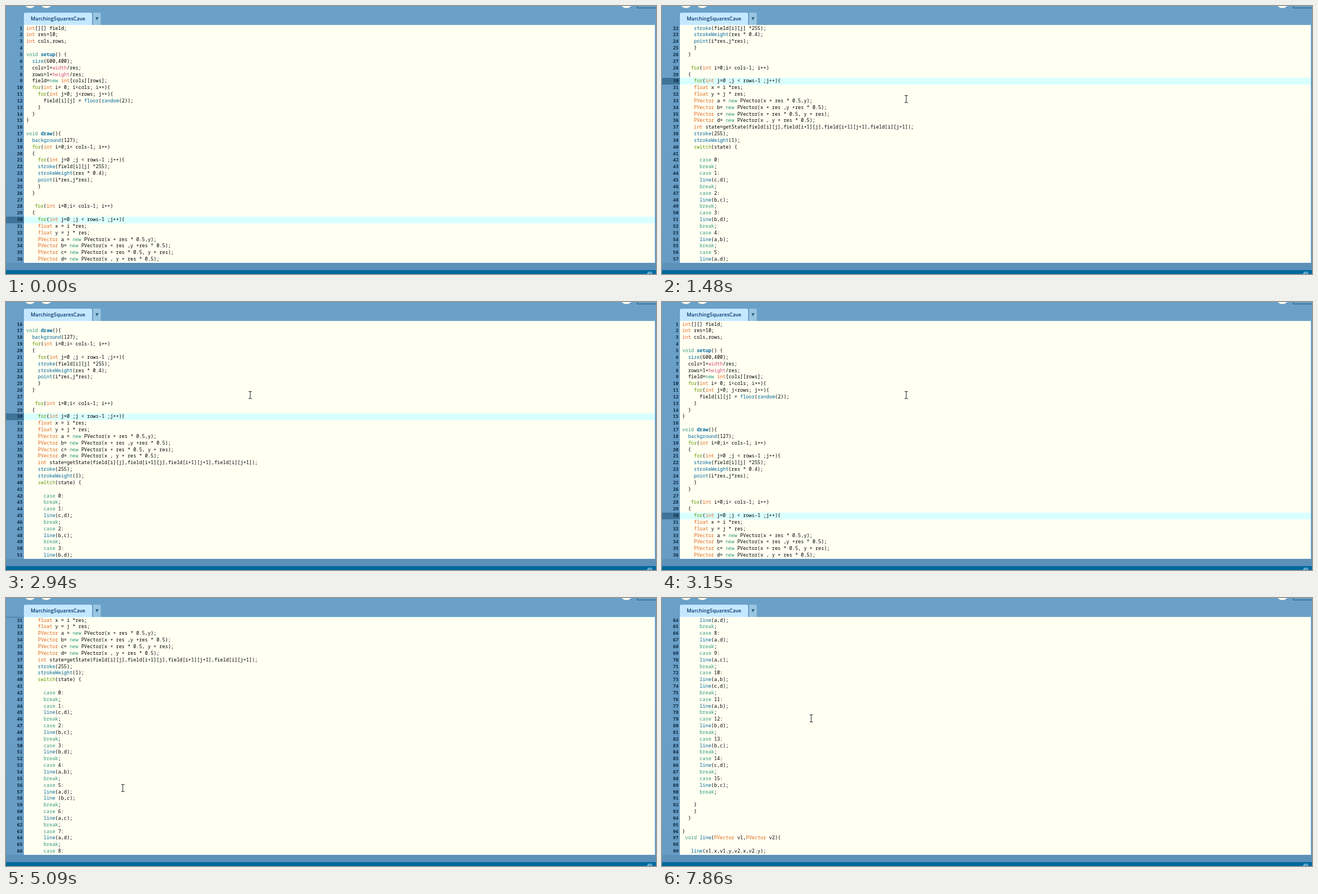
An HTML page that plays this animation: 1163 px wide and 481 px high, repeating every 8 s.

```html
<!DOCTYPE html>
<html lang="en">
<head>
<meta charset="utf-8">
<title>Code editor</title>
<style>
html, body { margin: 0; width: 100%; height: 100%; overflow: hidden; }
body {
  position: relative;
  background: linear-gradient(#6ba0c8, #679cc4 461px, #5c91b9 461px);
}
body > *, .row > *, #mark { position: absolute; }
svg { left: 0; top: 0; }
.tab {
  left: 32px; top: 12px; width: 122px; height: 22px; border-radius: 3px 3px 0 0;
  background: #c4e8ff; color: #07376b; text-align: center;
  font: 600 9.15px/21px "Open Sans", "Noto Sans", sans-serif;
}
.paper { left: 32px; top: 34px; width: 1129px; height: 427px; background: #fffff2; }
#view { left: 0; top: 34px; width: 1161px; height: 427px; overflow: hidden; }
#code { position: absolute; left: 0; top: 0; width: 100%; }
/* 11.84375px is a whole number of layout units, so rows do not drift */
.row {
  position: relative; height: 11.84375px; white-space: pre; color: #000;
  font: 8.64px/11.84375px "Noto Sans Mono", "DejaVu Sans Mono", monospace;
  font-variant-ligatures: none;
}
.row b { left: 0; width: 29.8px; text-align: right; color: #12304a; font-weight: 600; }
.row span { left: 36.3px; }
.row i { font-style: normal; }
.row.on { background: linear-gradient(90deg, #3f7398 32px, #d9ffff 32px); }
.type { color: #e2661a; }
.word { color: #33997e; }
.flow { color: #669900; }
.func, .main { color: #006699; }
.main { font-weight: bold; }
.var { color: #d94a7a; }
#mark {
  left: 57px; width: 5px; height: 11.84375px; box-sizing: border-box;
  border: 1px solid #3a7795; background: #d9f3f8;
}
#mouse { fill: none; stroke: #333; stroke-width: 1.1; }
</style>
</head>
<body>
<svg width="1163" height="481">
  <g fill="#fffff2">
    <circle cx="43" cy="-8" r="11.500"/>
    <circle cx="72" cy="-8" r="11.500"/>
    <circle cx="1110" cy="-8" r="11.500"/>
  </g>
  <path d="M1129.500 0V3.500H1163" fill="none" stroke="#1f4f78"/>
  <path d="M156 34V12H166.500Q169.500 12 169.500 15V34Z" fill="#9ac5e0"/>
  <path d="M160 20H165.500L162.750 26Z" fill="#2f6794"/>
  <rect y="474" width="1163" height="7" fill="#00699e"/>
  <path d="M1149.500 481V477.500H1155.500V481M1147.500 481V479.500H1153.500V481" fill="none" stroke="#a9d3ea"/>
</svg>
<div class="tab">MarchingSquaresCave</div>
<div class="paper"></div>
<div id="view"><div id="code"></div></div>
<svg width="1163" height="481">
  <path id="mouse" d="M-3 -6.500H-1L0 -5.500L1 -6.500H3M0 -5.500V5.500M-3 6.500H-1L0 5.500L1 6.500H3"/>
</svg>
<script>
const LOOP = 8000, STEP = 69, PITCH = 11.84375, INSET = 0.6;

const head = `int[][] field;
int res=10;
int cols,rows;

void setup() {
  size(600,400);
  cols=1+width/res;
  rows=1+height/res;
  field=new int[cols][rows];
  for(int i= 0; i<cols; i++){
    for(int j=0; j<rows; j++){
      field[i][j] = floor(random(2));
    }
  }
}

void draw(){
  background(127);
  for(int i=0;i< cols-1; i++)
  {
    for(int j=0 ;j < rows-1 ;j++){
    stroke(field[i][j] *255);
    strokeWeight(res * 0.4);
    point(i*res,j*res);
    }
  }

   for(int i=0;i< cols-1; i++)
  {
    for(int j=0 ;j < rows-1 ;j++){
    float x = i *res;
    float y = j * res;
    PVector a = new PVector(x + res * 0.5,y);
    PVector b= new PVector(x + res ,y +res * 0.5);
    PVector c= new PVector(x + res * 0.5, y + res);
    PVector d= new PVector(x , y + res * 0.5);
    int state=getState(field[i][j],field[i+1][j],field[i+1][j+1],field[i][j+1]);
    stroke(255);
    strokeWeight(1);
    switch(state) {
`;
const tail = `
    }
    }
  }

}
 void line(PVector v1,PVector v2){

   line(v1.x,v1.y,v2.x,v2.y);
 }
 int getState(int a,int b,int c,int d){

    return  a * 8 + b * 4 + c* 2 + d* 1;
  }
`;
// Line arguments of each switch case
const cases = "|cd|bc|bd|ab|ad bc|ac|ad|ad|ac|ab cd|ab|bd|bc|cd|bc".split("|").flatMap((pairs, n) => [
  `case ${n}:`,
  ...pairs.split(" ").filter(Boolean).map((p, k) => `line${n === 5 && k ? " " : ""}(${p[0]},${p[1]});`),
  "break;"
]).map(s => "      " + s);

const kinds = {};
const addKind = (kind, words) => words.split(" ").forEach(w => kinds[w] = kind);
addKind("type", "int float PVector");
addKind("word", "void new case break return");
addKind("flow", "for switch");
addKind("func", "size floor random background stroke strokeWeight point line");
addKind("main", "setup draw");
addKind("var", "width height");

const paint = line => line.replace(/</g, "&lt;").replace(/\b[A-Za-z]\w*\b(?!(?<=PVector)\()/g,
  w => kinds[w] ? `<i class="${kinds[w]}">${w}</i>` : w);

const lines = [...head.split("\n"), ...cases, ...tail.split("\n")];
const code = document.getElementById("code");
code.innerHTML = lines.map((line, n) =>
  `<div class="row"><b>${n + 1}</b><span>${paint(line)}</span></div>`).join("");
const rows = code.querySelectorAll(".row");
const mark = document.createElement("div");
mark.id = "mark";
rows[92].prepend(mark);
const mouse = document.getElementById("mouse");

// Each burst: start time, then one value per step
const scrolls = [
  [0, 1], [1270, 4, 10, 16, 22], [1940, 28, 34], [2470, 28, 22], [2940, 16, 10, 4, 1],
  [4620, 10, 19], [5090, 31, 43, 52], [5560, 61, 70], [7790, 67, 64]
];
const moves = [
  [0, null],
  [260, [1014, 445], [780, 325], [610, 245], [523, 209]],
  [670, [437, 167]],
  [3830, [350, 212], [255, 265], [199, 297]],
  [4220, [209, 341]],
  [6160, [195, 320], [165, 304], [135, 301], [117, 318], [115, 355], [125, 395], [145, 422], [162, 431], [172, 427]],
  [7390, [235, 290], [267, 216]]
];

function valueAt(bursts, t) {
  const [start, ...values] = bursts.findLast(b => b[0] <= t);
  // Steps fall on a 10 ms grid
  const passed = values.filter((_, k) => start + Math.round(k * STEP / 10) * 10 <= t);
  return passed[passed.length - 1];
}

const begin = performance.now();
function draw() {
  const t = (performance.now() - begin) % LOOP;
  const clicked = t >= 6930;
  code.style.top = INSET + (1 - valueAt(scrolls, t)) * PITCH + "px";
  rows[29].classList.toggle("on", !clicked);
  rows[102].classList.toggle("on", clicked);
  mark.style.display = clicked ? "none" : "";
  const spot = valueAt(moves, t);
  mouse.style.display = spot ? "" : "none";
  if (spot) mouse.setAttribute("transform", `translate(${spot})`);
  requestAnimationFrame(draw);
}
draw();
</script>
</body>
</html>
```
